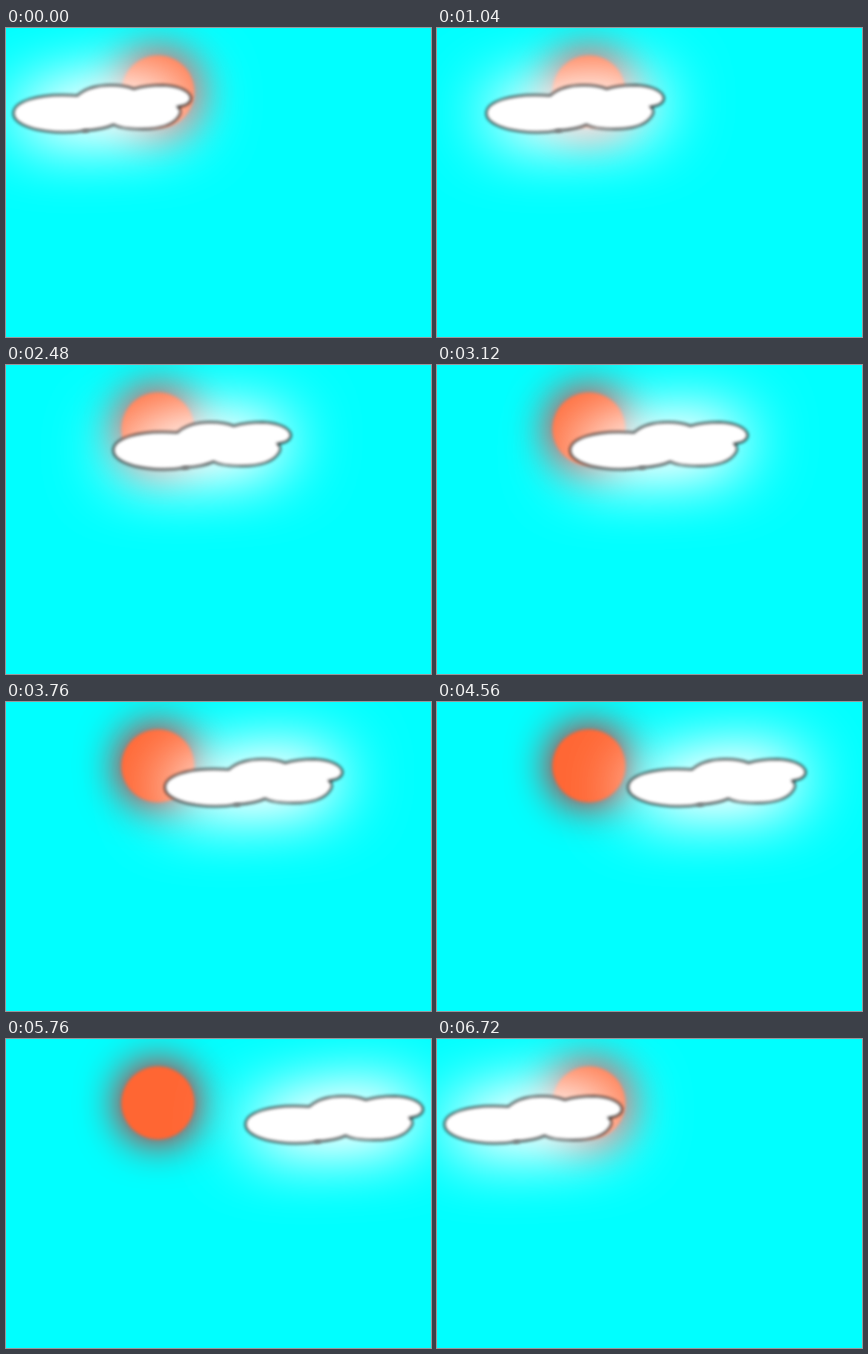
Write an HTML page that moves like this. It is 572 px wide and 416 px high and loops after 6800 ms.

```html
<!DOCTYPE html>
<html lang="en">
<head>
<meta charset="utf-8">
<title>Sun and cloud</title>
<style>
  html, body { margin: 0; width: 100%; height: 100%; overflow: hidden; background: #0ff; }
  svg { display: block; width: 572px; height: 416px; }
  .soft { filter: blur(2px); }
</style>
</head>
<body>
<svg viewBox="0 0 572 416">
  <defs>
    <path id="shape" d="M96 91C108 80 124 77 141 77Q160 77 172 82C185 78 200 77 212 77
      C236 78 249 87 249 95C248 102 240 105 231 106C236 110 235 115 233 118
      C225 131 205 136 183 136C168 136 153 135 145 130C135 135 122 137 107 138
      C90 141 70 141 55 139C30 136 10 127 10 115C10 100 40 87 96 91Z"/>
    <filter id="sun-glow" x="-2" y="-2" width="5" height="5">
      <feGaussianBlur stdDeviation="30"/>
      <feComponentTransfer><feFuncA type="linear" slope="1.2"/></feComponentTransfer>
    </filter>
    <filter id="cloud-glow" x="-1" y="-3.5" width="3" height="8">
      <feGaussianBlur stdDeviation="47"/>
      <feComponentTransfer><feFuncA type="linear" slope="2"/></feComponentTransfer>
    </filter>
  </defs>
  <rect width="572" height="416" fill="#0ff"/>
  <circle filter="url(#sun-glow)" cx="204.5" cy="86" r="49" fill="#f00"/>
  <circle class="soft" cx="204.5" cy="86" r="49" fill="#f63"/>
  <g id="cloud">
    <use filter="url(#cloud-glow)" href="#shape" fill="#fff"/>
    <use class="soft" href="#shape" fill="#fff" stroke="#000" stroke-width="2"/>
    <ellipse class="soft" cx="107" cy="138.5" rx="5" ry="2" fill="#777"/>
  </g>
</svg>
<script>
  const STEP = 80, FRAMES = 85, TRAVEL = 360;
  const cloud = document.getElementById('cloud');
  const start = performance.now();

  function draw() {
    const frame = Math.floor((performance.now() - start) / STEP) % FRAMES;
    // The last frame of the loop already shows the starting position.
    const x = frame % (FRAMES - 1) / (FRAMES - 2) * TRAVEL;
    cloud.setAttribute('transform', `translate(${x} 0)`);
    requestAnimationFrame(draw);
  }
  draw();
</script>
</body>
</html>
```
